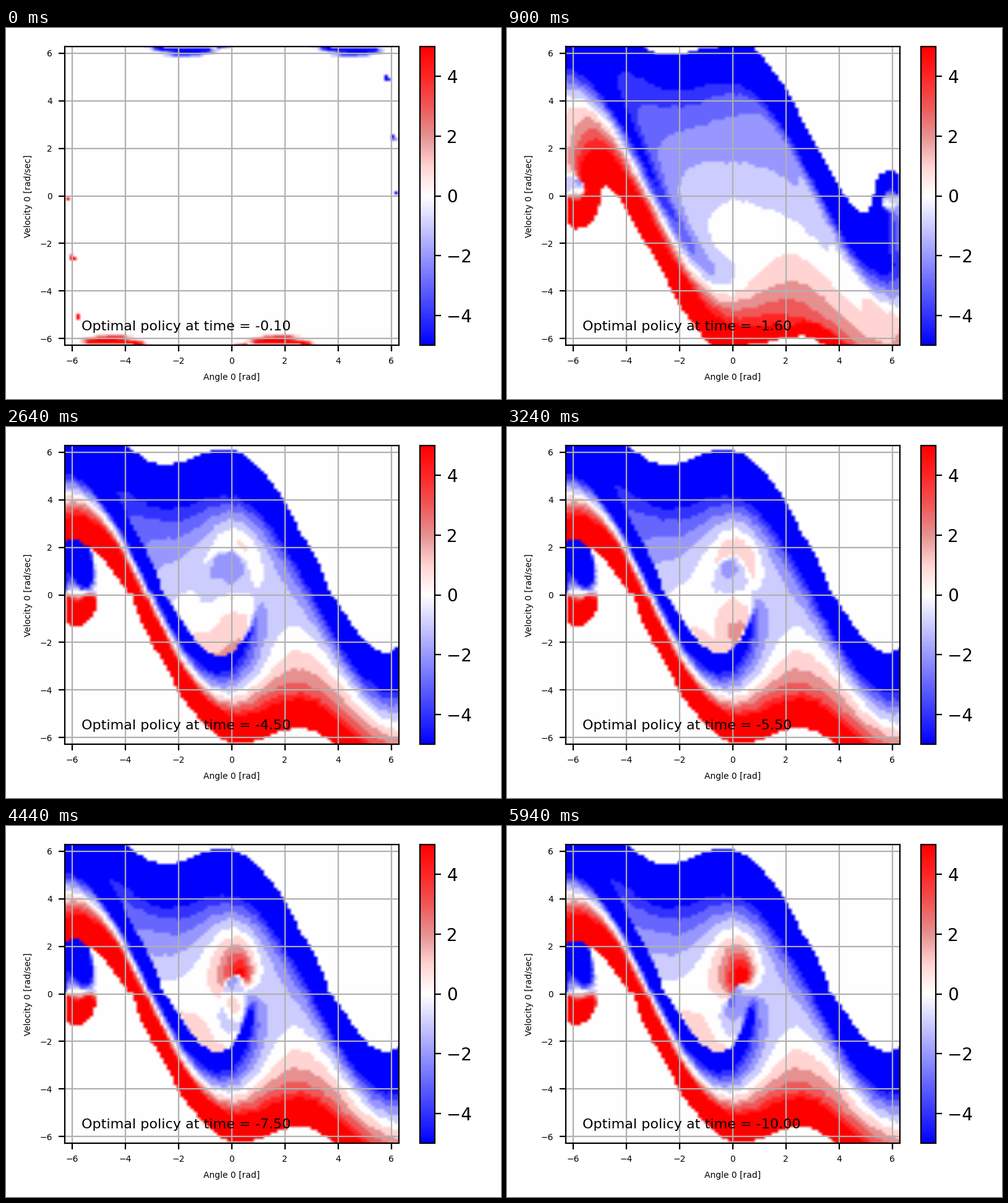
These frames come from a looping animation (800 by 600 pixels, 5.97 s). A matplotlib script:

```python
import numpy as np
import matplotlib.pyplot as plt
from matplotlib.animation import FuncAnimation
from matplotlib.cm import ScalarMappable
from matplotlib.colors import LinearSegmentedColormap, Normalize

plt.rcParams["font.family"] = "DejaVu Sans"

N = 101            # grid nodes per state
DT = 0.05
SKIP = 2           # solver steps per picture
SHOWN = 100
LIM = 2 * np.pi
INF = 300.0        # cost of leaving the domain
TARGET = -3.14     # upright pendulum

COLORS = ["#0000ff", "#3333ff", "#6666ff", "#9999ff", "#ccccff", "#ffffff",
          "#ffd4d2", "#e69292", "#ef5858", "#ff2626", "#ff0000"]
CMAP = LinearSegmentedColormap.from_list("torque", COLORS)
NORM = Normalize(-5, 5)

axis = np.linspace(-LIM, LIM, N)
torques = np.linspace(-5, 5, 11)
H = axis[1] - axis[0]


def cell(x):
    """Lower node and fraction for linear interpolation."""
    s = np.clip((x + LIM) / H, 0, N - 1)
    i = np.minimum(s.astype(int), N - 2)
    return i, s - i


def solve():
    """Dynamic programming backward in time; returns the shown images."""
    q = axis[:, None, None]
    v = axis[None, :, None]
    u = torques[None, None, :]
    q1 = v * DT + q
    v1 = (u - 9.81 * np.sin(q)) / 2 * DT + v
    inside = (np.abs(q1) <= LIM) & (np.abs(v1) <= LIM)
    stage = ((q - TARGET) ** 2 + v ** 2 + u ** 2) * DT

    (i, fi), (j, fj) = cell(q1), cell(v1)
    base = i * N + j
    w00, w01 = (1 - fi) * (1 - fj), (1 - fi) * fj
    w10, w11 = fi * (1 - fj), fi * fj

    cost = np.zeros((N, N))
    images = []
    for step in range(1, SHOWN * SKIP + 1):
        c = cost.ravel()
        ahead = (w00 * c[base] + w01 * c[base + 1]
                 + w10 * c[base + N] + w11 * c[base + N + 1])
        total = np.where(inside, stage + ahead, INF)
        policy = torques[total.argmin(axis=2)]
        cost = np.minimum(total.min(axis=2), INF)
        policy[cost > INF - 1] = 0
        if step % SKIP == 0:
            images.append(CMAP(NORM(policy.T), bytes=True)[..., :3])
    return images


images = solve()


def px_box(x0, y0, x1, y1):
    return [x0 / 800, 1 - y1 / 600, (x1 - x0) / 800, (y1 - y0) / 600]


fig = plt.figure(figsize=(4, 3), dpi=200, facecolor="white")
ax = fig.add_axes(px_box(94.5, 30, 635, 513))
edge = LIM + H / 2
img = ax.imshow(images[0], origin="lower", extent=(-edge, edge, -edge, edge),
                aspect="auto", interpolation="bilinear")
ax.set(xlim=(-LIM, LIM), ylim=(-LIM, LIM),
       xticks=range(-6, 7, 2), yticks=range(-6, 7, 2))
ax.set_xlabel("Angle 0 [rad]", fontsize=5)
ax.set_ylabel("Velocity 0 [rad/sec]", fontsize=5)
ax.tick_params(labelsize=5)
ax.grid(True)
label = ax.text(0.05, 0.05, "", transform=ax.transAxes, fontsize=8)

cax = fig.add_axes(px_box(669, 30, 693, 513))
fig.colorbar(ScalarMappable(NORM, CMAP), cax=cax, ticks=range(-4, 5, 2))


def update(frame):
    shown = frame // 2
    img.set_data(images[shown])
    time = -(shown + 1) * SKIP * DT
    label.set_text(f"Optimal policy at time = {time:.2f}")
    return img, label


# Each picture lasts two ticks, the last one a single tick.
anim = FuncAnimation(fig, update, frames=2 * SHOWN - 1, interval=30,
                     repeat=True, repeat_delay=0)
plt.show()
```
